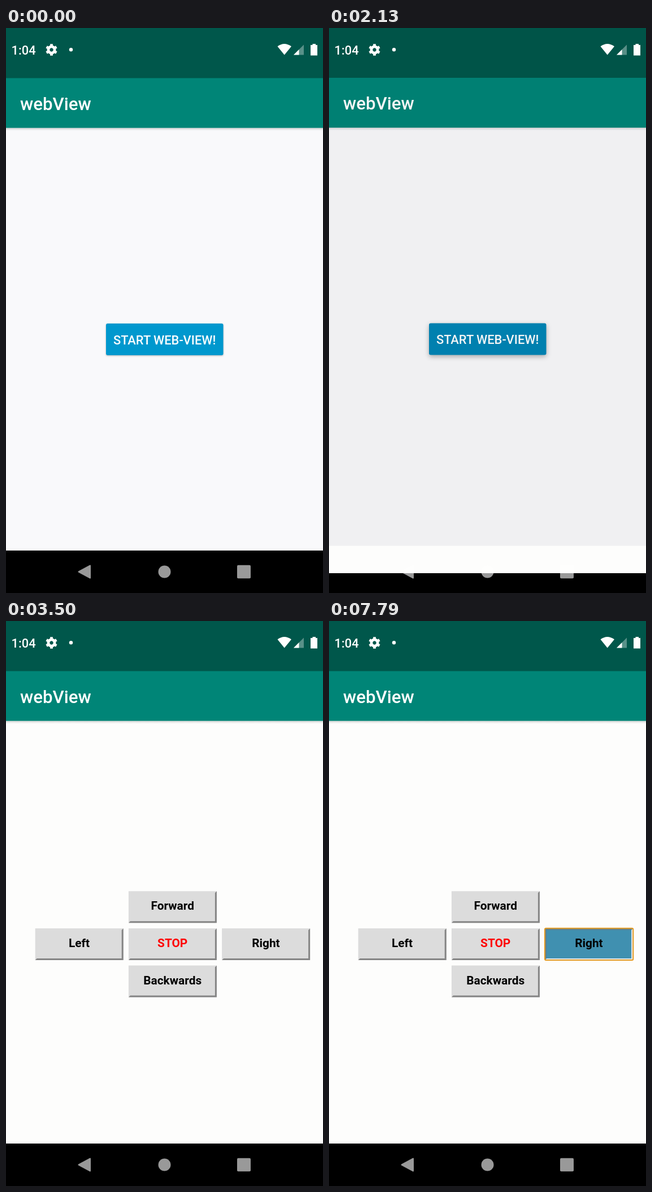
Write an HTML page that moves like this. It is 561 by 998 pixels and loops after 8000 ms.

```html
<!DOCTYPE html>
<html lang="en">
<head>
<meta charset="utf-8">
<title>webView</title>
<style>
  html, body { margin: 0; width: 100%; height: 100%; overflow: hidden; background: #000; }
  svg { display: block; width: 100vw; height: 100vh; }
  text { font-family: Roboto, sans-serif; font-weight: 500; }
  .caption { font-size: 21.875px; fill: #fff; }
  .label { font-size: 20.83px; font-weight: 700; text-anchor: middle; }
</style>
</head>
<body>
<svg viewBox="0 0 561 998" preserveAspectRatio="none">
  <defs>
    <linearGradient id="shade" x2="0" y2="1">
      <stop stop-opacity=".15"/>
      <stop offset="1" stop-opacity="0"/>
    </linearGradient>
    <g id="appBar">
      <rect width="561" height="89" fill="#00574b"/>
      <rect y="88.5" width="561" height="88" fill="#008577"/>
      <rect y="176.5" width="561" height="5" fill="url(#shade)"/>
      <text x="25" y="144.5" font-size="31.25" fill="#fff">webView</text>
    </g>
    <clipPath id="reveal"><rect id="revealBox" width="561" height="998"/></clipPath>
  </defs>

  <g id="home">
    <rect width="561" height="923" fill="#f9f9fb"/>
    <rect y="923" width="561" height="75"/>
    <use href="#appBar"/>
    <rect id="start" x="177" y="522" width="207.5" height="56" rx="3"/>
    <text class="caption" x="280.7" y="558.5" text-anchor="middle">START WEB-VIEW!</text>
    <rect id="dim" width="561" height="998" opacity="0"/>
  </g>

  <g id="remote">
    <g clip-path="url(#reveal)">
      <rect width="561" height="923" fill="#fdfdfc"/>
      <rect y="923" width="561" height="75"/>
      <use href="#appBar"/>
      <g id="pad"></g>
    </g>
  </g>

  <g fill="#fff">
    <text class="caption" x="9.5" y="47">1:04</text>
    <g transform="translate(80.5 38.5)">
      <circle r="5.6" fill="none" stroke="#fff" stroke-width="4.8"/>
      <path id="cogs" stroke="#fff" stroke-width="4.8"/>
    </g>
    <circle cx="115" cy="38.3" r="3.2"/>
    <path d="M480.5 32.5Q492.5 23.5 505 32.5L492.7 47.5Z"/>
    <path d="M527 29.5V47.5H509Z" opacity=".35"/>
    <path d="M518.5 38V47.5H509Z"/>
    <path d="M542.5 28H548V30H551V48.5H539V30H542.5Z"/>
  </g>
  <g fill="#fff" opacity=".6">
    <path d="M128.5 960.5L149 949.5V971.5Z" stroke="#fff" stroke-width="2" stroke-linejoin="round"/>
    <circle cx="280.5" cy="960.5" r="11"/>
    <rect x="409" y="948.7" width="24" height="23.6" rx="2"/>
  </g>
</svg>
<script>
const LOOP = 8000, PRESS = 1670, OPEN = 2090, OPEN_LENGTH = 425;
const byId = id => document.getElementById(id);
const clamp = v => Math.max(0, Math.min(1, v));
const mix = (a, b, p) => a + (b - a) * p;

// label, column, row, time at which it becomes the selected button
const BUTTONS = [
  ['Forward', 1, 0, 3620],
  ['STOP', 1, 1, 4370],
  ['Left', 0, 1, 4880],
  ['Backwards', 1, 2, 5460],
  ['Right', 2, 1, 6100]
];

byId('cogs').setAttribute('d', Array.from({ length: 6 }, (_, i) => {
  const a = i * Math.PI / 3 + Math.PI / 6;
  const point = r => `${r * Math.cos(a)} ${r * Math.sin(a)}`;
  return `M${point(6)}L${point(10.2)}`;
}).join(''));

byId('pad').innerHTML = BUTTONS.map(([label, column, row]) => `
  <g transform="translate(${51.7 + column * 165.2} ${477.3 + row * 65.6})">
    <g class="idle">
      <rect width="156" height="56" fill="#dcdcdc"/>
      <path d="M156 0V56H0L3 53H153V3Z" fill="#858585"/>
    </g>
    <g class="selected">
      <rect width="156" height="56" fill="#4090b0"/>
      <path d="M0 56V0H156L153 3H3V53Z" fill="#5d8090"/>
      <path d="M156 0V56H0L3 53H153V3Z" fill="#e4e8ea"/>
      <rect x="-.2" y="-.2" width="156.4" height="56.4" rx="2" fill="none" stroke="#e59a20" stroke-width="2"/>
    </g>
    <text class="label" x="77.8" y="33" fill="${label === 'STOP' ? '#f00' : '#000'}">${label}</text>
  </g>`).join('');
const keys = [...byId('pad').children];

function bezier(x, xs, ys) {
  const at = (c, s) => {
    const r = 1 - s;
    return c[0] * r ** 3 + 3 * c[1] * s * r * r + 3 * c[2] * s * s * r + c[3] * s ** 3;
  };
  let low = 0, high = 1;
  for (let i = 0; i < 24; i++) {
    const middle = (low + high) / 2;
    if (at(xs, middle) < x) low = middle; else high = middle;
  }
  return at(ys, low);
}

const slideEase = x => bezier(x, [0, .4, .2, 1], [0, 0, 1, 1]);
const revealEase = x => x < 1 / 6
  ? bezier(x, [0, .05, .1333, 1 / 6], [0, 0, .06, .4])
  : bezier(x, [1 / 6, .2083, .25, 1], [.4, .82, 1, 1]);

function draw(t) {
  const pressed = clamp((t - PRESS) / 80);
  const start = byId('start');
  start.style.fill = `rgb(0 ${mix(152, 133, pressed)} ${mix(206, 181, pressed)})`;
  start.style.filter =
    `drop-shadow(0 ${mix(1.5, 3, pressed)}px ${mix(1.5, 4, pressed)}px rgba(0,0,0,${mix(.28, .3, pressed)}))`;

  const progress = clamp((t - OPEN) / OPEN_LENGTH);
  const slide = slideEase(progress);
  const top = 957 * (1 - revealEase(progress));
  byId('home').setAttribute('transform', `translate(0 ${-20 * slide})`);
  byId('dim').setAttribute('opacity', .1 * clamp((t - OPEN) / 117));
  byId('remote').setAttribute('transform', `translate(0 ${41 * (1 - slide)})`);
  byId('remote').style.display = t < OPEN ? 'none' : '';
  byId('revealBox').setAttribute('y', top);

  const current = BUTTONS.filter(button => t >= button[3]).length - 1;
  keys.forEach((key, i) => {
    key.querySelector('.idle').style.display = i === current ? 'none' : '';
    key.querySelector('.selected').style.display = i === current ? '' : 'none';
  });
}

function tick() {
  draw(performance.now() % LOOP);
  requestAnimationFrame(tick);
}
tick();
</script>
</body>
</html>
```
